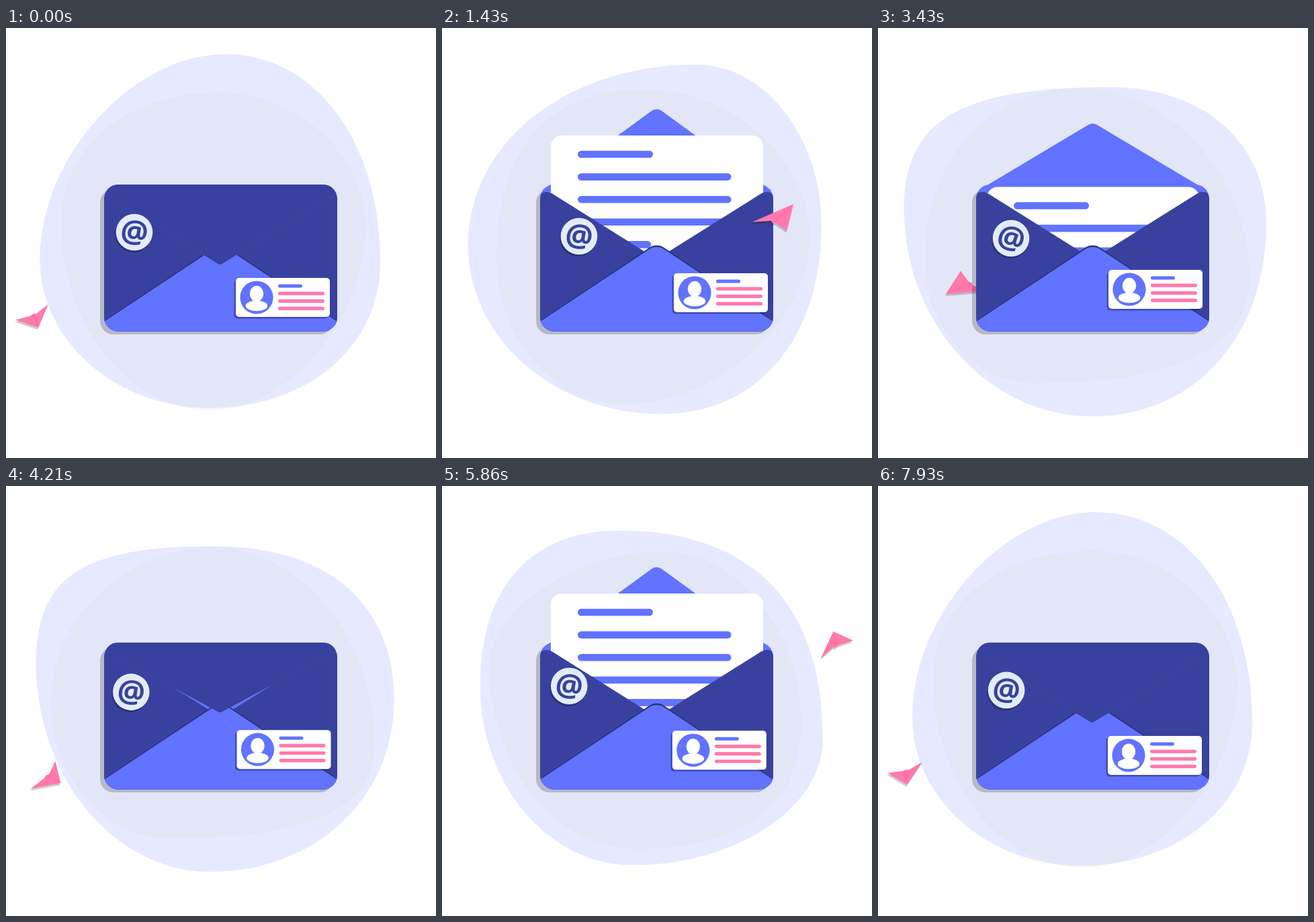
Animation of 640x640 px, one loop 8 s. Source, as an HTML page with a canvas:

```html
<!DOCTYPE html>
<html lang="en">
<head>
<meta charset="utf-8">
<title>Mail</title>
<style>
  html, body { margin: 0; width: 100%; height: 100%; overflow: hidden; background: #fff; }
  canvas { display: block; width: 640px; height: 640px; }
</style>
</head>
<body>
<canvas id="stage" width="640" height="640"></canvas>
<script>
const ctx = document.getElementById('stage').getContext('2d');
const LOOP = 8000, CYCLE = 4000, TAU = 2 * Math.PI;
const BLUE = '#6173ff', NAVY = '#38429e', DEEP = '#2b3377', PINK = '#ff7aab';
const MID = 319.5;

// Every drifting value is a mean plus one cosine and one sine of the phase.
const wave = (p, mean, c = 0, s = 0) => mean + c * Math.cos(p) + s * Math.sin(p);
const clamp = v => Math.min(1, Math.max(0, v));
function ease(t, start, length) {
  const x = clamp((t - start) / length);
  return x < .5 ? 4 * x * x * x : 1 - 4 * (1 - x) ** 3;
}

// Moves softly from stop to stop around the loop.
const stops = [0, 1430, 2290, 3430, 4930, 6860, LOOP];
function wander(points, t) {
  const i = stops.findIndex(s => s > t) - 1;
  const u = (t - stops[i]) / (stops[i + 1] - stops[i]);
  const w = (1 - Math.cos(Math.PI * u)) / 2;
  const next = points[(i + 1) % points.length];
  return points[i].map((v, j) => v + (next[j] - v) * w);
}

function fill(color) { ctx.fillStyle = color; ctx.fill(); }
function box(x, y, w, h, r, color) {
  ctx.beginPath();
  ctx.roundRect(x, y, w, h, r);
  fill(color);
}
function oval(x, y, rx, ry, color) {
  ctx.beginPath();
  ctx.ellipse(x, y, rx, ry, 0, 0, TAU);
  fill(color);
}
function bar(x, y, length, width, color) {
  if (length > 0) box(x, y - width / 2, Math.max(length, width), width, width / 2, color);
}
function poly(points, color) {
  ctx.beginPath();
  points.forEach(p => ctx.lineTo(p[0], p[1]));
  ctx.closePath();
  fill(color);
}
// Triangle on a horizontal base with a rounded tip
function peak(inset, base, tip, r, color) {
  ctx.beginPath();
  ctx.moveTo(146 + inset, base);
  ctx.arcTo(MID, tip, 493 - inset, base, r);
  ctx.lineTo(493 - inset, base);
  ctx.closePath();
  fill(color);
}

// Closed curve through its four extremes; round holds one handle ratio per corner.
function blob(left, top, right, bottom, round, color) {
  const ends = [left, top, right, bottom];
  ctx.beginPath();
  ctx.moveTo(...left);
  ends.forEach(([x, y], i) => {
    const [nx, ny] = ends[(i + 1) % 4], k = round[i];
    if (i % 2) ctx.bezierCurveTo(x + k * (nx - x), y, nx, ny + k * (y - ny), nx, ny);
    else ctx.bezierCurveTo(x, y + k * (ny - y), nx + k * (x - nx), ny, nx, ny);
  });
  fill(color);
}

function backdrop(t) {
  const w = wave.bind(null, t / LOOP * TAU);
  blob([w(46.7, 3.8, -10.6), w(303.6, 40.3, 2.7)],
    [w(323, 4, 60), w(64.5, -25.5, 1)],
    [w(567.5, -10.5, 2), w(329.6, 19.5, -50)],
    [w(305.7, -2.8, 23.9), w(570.5, -5, 6.8)],
    [w(.62, -.12), w(.6, -.02, -.05), w(.575, 0, .03), .55], '#e6e9ff');
  blob([w(75, 7.3, 3.8), w(308, -18.5, 44.6)],
    [w(312.8, 5.7, -16.2), w(93.6, 3, -3.9)],
    [w(542.2, -7.4, 8.6), w(336.5, -42, -8.4)],
    [w(271.4, 33.7, -19.8), w(546.5, 22, 4)],
    [w(.57, .02, .08), .53, w(.6, -.1, -.05), .55], 'rgba(212,212,212,.2)');
}

// The nose follows a tilted ellipse; the wings open wider in the turns.
function plane(u) {
  const p = u / CYCLE * TAU, rad = Math.PI / 180;
  const x = wave(p, 312, -264, 58.6), y = wave(p, 329, 117, 8);
  const aim = wave(p, -115, 9, -5) + wave(2 * p, 0, -8, -22) - p / rad;
  const spread = wave(2 * p, 30, 17);
  const arm = (deg, len) => [Math.cos(deg * rad) * len, Math.sin(deg * rad) * len];
  const A = arm(aim + spread, wave(2 * p, 52, -14, -12));
  const B = arm(aim - spread, wave(2 * p, 49, -13, 11));
  const mix = (a, b) => [x + a * A[0] + b * B[0], y + a * A[1] + b * B[1]];
  const shape = [mix(0, 0), mix(1, 0), mix(.49, .3), mix(.46, .4), mix(.35, .48), mix(0, 1)];
  poly(shape.map(q => [q[0] - 1, q[1] + 3]), 'rgba(0,0,0,.2)');
  poly(shape, PINK);
  poly([shape[0], shape[2], shape[3], shape[4]], 'rgba(200,50,110,.07)');
}

function paper(u) {
  const y = 160 + 175 * (1 - ease(u, 452, 600) + ease(u, 3080, 734));
  box(162, y, 316, Math.min(180, 448 - y), 16, '#fff');
  for (let i = 0; i < 5; i++) {
    const drawn = clamp((u - 710 - i * 161) / 161), lineY = y + 28 + i * 33.6;
    if (lineY < 440) bar(202, lineY, (i ? 228.5 : 112) * drawn, 10.6, BLUE);
  }
}

function sideFlap() {
  ctx.beginPath();
  ctx.moveTo(146, 452);
  ctx.lineTo(146, 253);
  ctx.quadraticCurveTo(146, 244, 155, 244);
  ctx.quadraticCurveTo(161, 244, 168, 249);
  ctx.lineTo(MID, 344);
  ctx.lineTo(MID, 452);
  ctx.closePath();
  fill(NAVY);
}

function closedFlap(s) {
  ctx.translate(0, 233 * (1 - s));
  ctx.scale(1, s);
  ctx.beginPath();
  ctx.moveTo(146, 233);
  ctx.lineTo(146, 246);
  ctx.arcTo(MID - 1, 353, 493, 246, 6);
  ctx.lineTo(493, 246);
  ctx.lineTo(493, 233);
  ctx.closePath();
  fill(NAVY);
  ctx.strokeStyle = 'rgba(255,255,255,.035)';
  ctx.lineWidth = 1;
  ctx.stroke();
}

function front(flap) {
  ctx.save();
  ctx.beginPath();
  ctx.roundRect(146, 233, 347, 218.5, 21);
  ctx.clip();
  sideFlap();
  ctx.save();
  ctx.translate(2 * MID, 0);
  ctx.scale(-1, 1);
  sideFlap();
  ctx.restore();
  peak(0, 435.5, 319.5, 20, DEEP);
  peak(0, 437, 322, 20, BLUE);
  ctx.fillRect(146, 436.5, 347, 16);
  if (flap < 0) closedFlap(-flap);
  ctx.restore();
}

function badge(t) {
  const [x, y] = wander([[191, 304], [204, 310], [199, 306], [198, 313], [176, 301], [204, 294]], t);
  const tilt = 6 + 12 * Math.max(0, -Math.sin(t / CYCLE * TAU));
  oval(x - 1.5, y + 3, 27.3, 27.3, DEEP);
  oval(x, y, 27.3, 27.3, '#e3ebf7');
  ctx.save();
  ctx.translate(x, y);
  ctx.rotate(tilt * Math.PI / 180);
  ctx.font = 'bold 46px "Open Sans", "Noto Sans", sans-serif';
  ctx.fillStyle = NAVY;
  const m = ctx.measureText('@');
  ctx.fillText('@', (m.actualBoundingBoxLeft - m.actualBoundingBoxRight) / 2,
    (m.actualBoundingBoxAscent - m.actualBoundingBoxDescent) / 2);
  ctx.restore();
}

function card(t) {
  const [x, y] = wander([[342, 372], [345, 365], [349, 363], [343, 360], [344, 366], [341.5, 362.5]], t);
  ctx.save();
  ctx.translate(x, y);
  box(-2.5, 2.5, 140, 58, 5, 'rgba(25,30,95,.45)');
  box(0, 0, 140, 58, 5, '#fff');
  oval(31, 29, 24.6, 24.6, BLUE);
  oval(31, 23.5, 10.2, 11.8, '#fff');
  box(27, 31, 8, 8, 2, '#fff');
  oval(31, 41.5, 16.3, 7.8, '#fff');
  bar(63, 12, 36, 5, BLUE);
  for (let i = 0; i < 3; i++) bar(63, 23.2 + i * 11.1, 69, 5.2, PINK);
  ctx.restore();
}

function draw(now) {
  const t = now % LOOP, u = t % CYCLE;
  const flap = -1 + 2 * (ease(u, 80, 520) - ease(u, 3262, 600));
  const behind = u > 1960;
  ctx.fillStyle = '#fff';
  ctx.fillRect(0, 0, 640, 640);
  backdrop(t);
  if (behind) plane(u);
  box(140, 240, 347, 216, 20, 'rgba(0,0,0,.2)');
  box(146, 233, 347, 218.5, 21, BLUE);
  if (flap > 0) peak(3, 242, 242 - 124 * flap, 13, BLUE);
  paper(u);
  front(flap);
  badge(t);
  card(t);
  if (!behind) plane(u);
}

const begin = performance.now();
function tick() {
  draw(performance.now() - begin);
  requestAnimationFrame(tick);
}
tick();
</script>
</body>
</html>
```
